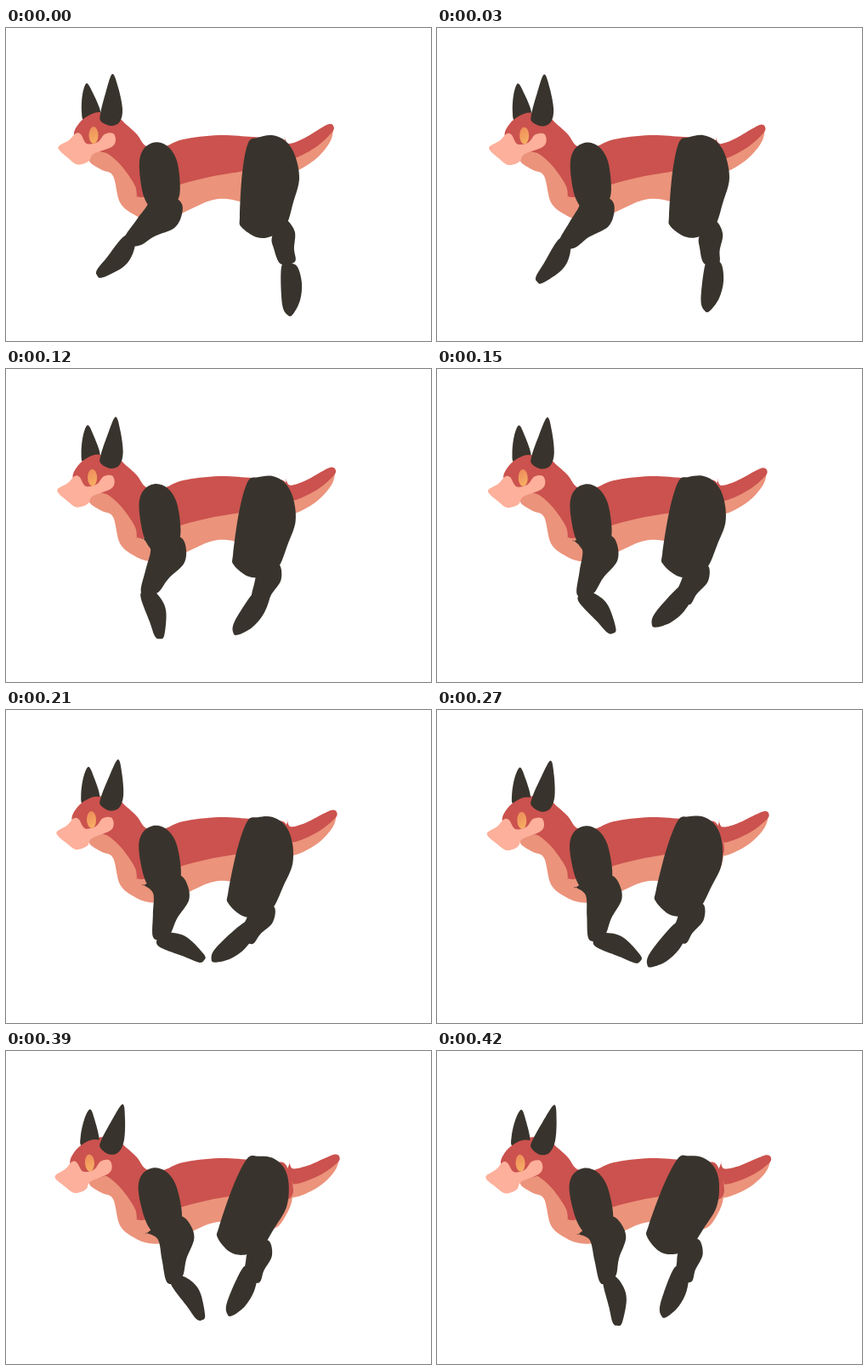
These frames come from a looping animation (500x368 px, 0.45 s). An HTML page with a canvas:

```html
<!DOCTYPE html>
<html>
<head>
<meta charset="utf-8">
<style>
html, body { margin: 0; width: 100%; height: 100%; overflow: hidden; background: #fff; }
canvas { display: block; }
</style>
</head>
<body>
<canvas id="stage" width="500" height="368"></canvas>
<script>
const ctx = document.getElementById('stage').getContext('2d');
const DARK = '#38342d', RED = '#cb524e', SALMON = '#eb937b', PINK = '#fdb09b';
const STEP_MS = 30, GATHER = 6, LAST = 14;

// Closed smooth curve through "x,y x,y ..."; a repeated point makes a corner.
function blob(color, text) {
  const pts = text.split(' ').map(p => p.split(',').map(Number));
  const at = i => pts[(i + pts.length) % pts.length];
  const path = new Path2D();
  path.moveTo(...pts[0]);
  pts.forEach((p, i) => {
    const before = at(i - 1), next = at(i + 1), after = at(i + 2);
    path.bezierCurveTo(
      p[0] + (next[0] - before[0]) / 6, p[1] + (next[1] - before[1]) / 6,
      next[0] - (after[0] - p[0]) / 6, next[1] - (after[1] - p[1]) / 6,
      next[0], next[1]);
  });
  return { color, path };
}

function ellipse(color, x, y, rx, ry) {
  const path = new Path2D();
  path.ellipse(x, y, rx, ry, 0, 0, Math.PI * 2);
  return { color, path };
}

const eyeColor = ctx.createLinearGradient(99, 118, 107, 136);
eyeColor.addColorStop(0, '#ee8f5c');
eyeColor.addColorStop(1, '#f8b263');

// A part glides from its first pose to its last, lower legs by way of a gathered pose.
// Pose: where the pivot lies (x, y) and the turn in degrees.
const part = (pivot, poses, shapes, turnEase = [1, 1]) => ({ pivot, poses, shapes, turnEase });

const tail = part([330, 145], [[330, 145, 0], [334, 147, 8]], [
  blob(SALMON, '325,150 345,138 370,121 382,114 385,117 383,130 375,143 362,156 342,168 328,169'),
  blob(RED, '328,130 328,130 333,136 350,130 370,118 380,113 385,115 384,122 366,139 340,153 325,152')]);

const torso = part([0, 0], [[0, 0, 0], [0, 0, 0]], [
  blob(SALMON, '98,148 99,158 113,167 126,174 134,205 150,219 168,226 190,225 215,214 ' +
    '240,203 260,201 285,206 315,209 330,192 337,172 334,150 300,140 160,145 130,130 108,138'),
  blob(RED, '105,104 130,105 142,114 154,125 165,139 185,140 208,131 250,126 290,128 318,130 330,135 ' +
    '338,164 328,175 300,165 275,169 240,175 205,184 165,198 154,198 154,198 ' +
    '152,186 142,170 132,158 120,148 105,140')]);

const leftEar = part([99, 107], [[99, 107, 0], [96, 111, 10]], [
  blob(DARK, '95,65 103,78 111,98 106,105 92,109 89,98 90,78')]);

const head = part([100, 125], [[100, 125, 0], [95, 131, -3]], [
  blob(RED, '80,126 86,112 97,103 110,99 124,104 135,115 130,138 110,144 90,145'),
  blob(PINK, '62,139 74,132 82,124 88,125 95,136 108,134 116,125 126,124 129,132 ' +
    '124,140 103,148 98,156 90,160 82,160 72,152 64,145'),
  ellipse(eyeColor, 103, 126, 5.5, 10)]);

const rightEar = part([124, 112], [[124, 112, 0], [122, 119, 15]], [
  blob(DARK, '125,54 132,70 137,95 134,110 124,115 112,110 111,101 117,77')]);

const foreFoot = part([167, 262], [[149, 252, 48], [180, 266, -59], [207, 266, -4]], [
  blob(DARK, '155,264 168,260 178,273 181,290 174,316 168,319 163,315 160,297')], [1.5, 4]);

const forearm = part([187, 205], [[188, 206, 23], [190, 205, -9], [194, 208, -25]], [
  blob(DARK, '159,200 159,200 168,212 163,236 158,262 168,267 179,262 190,246 208,227 209,207 201,196 180,195')]);

const upperArm = part([185, 195], [[184, 195, 5], [187, 197, -2]], [
  blob(DARK, '174,135 161,141 155,155 157,177 164,201 175,214 190,213 203,202 205,185 199,156 188,140')]);

const hindFoot = part([332, 283], [[332, 283, 0], [283, 257, 53], [285, 261, 22]], [
  blob(DARK, '324,281 334,277 343,281 348,300 346,320 338,336 332,338 325,325')]);

const shin = part([318, 234], [[322, 235, -15], [305, 235, 32], [298, 228, 8]], [
  blob(DARK, '306,243 317,229 328,227 334,243 328,262 325,277 308,275 305,255')]);

const thigh = part([312, 130], [[312, 130, 0], [311, 129, 17]], [
  blob(DARK, '285,135 296,129 313,126 329,133 340,150 345,177 338,205 329,233 312,245 295,246 277,234 275,221 278,170')]);

const parts = [tail, torso, leftEar, head, rightEar, foreFoot, forearm, upperArm, hindFoot, shin, thigh];

function mix(a, b, t, turnEase) {
  return a.map((v, i) => v + (b[i] - v) * (i === 2 ? t ** turnEase : t));
}

function poseAt({ poses: [first, middle, last], turnEase }, step) {
  if (!last) return mix(first, middle, step / LAST, 1);
  return step < GATHER
    ? mix(first, middle, step / GATHER, turnEase[0])
    : mix(middle, last, (step - GATHER) / (LAST - GATHER), turnEase[1]);
}

function drawPart(p, step) {
  const [x, y, turn] = poseAt(p, step);
  ctx.save();
  ctx.translate(x, y);
  ctx.rotate(turn * Math.PI / 180);
  ctx.translate(-p.pivot[0], -p.pivot[1]);
  for (const { color, path } of p.shapes) {
    ctx.fillStyle = color;
    ctx.fill(path);
  }
  ctx.restore();
}

let start;
function tick(now) {
  start ??= now;
  const step = Math.floor((now - start) / STEP_MS) % (LAST + 1);
  ctx.fillStyle = '#fff';
  ctx.fillRect(0, 0, 500, 368);
  parts.forEach(p => drawPart(p, step));
  requestAnimationFrame(tick);
}
requestAnimationFrame(tick);
</script>
</body>
</html>
```
